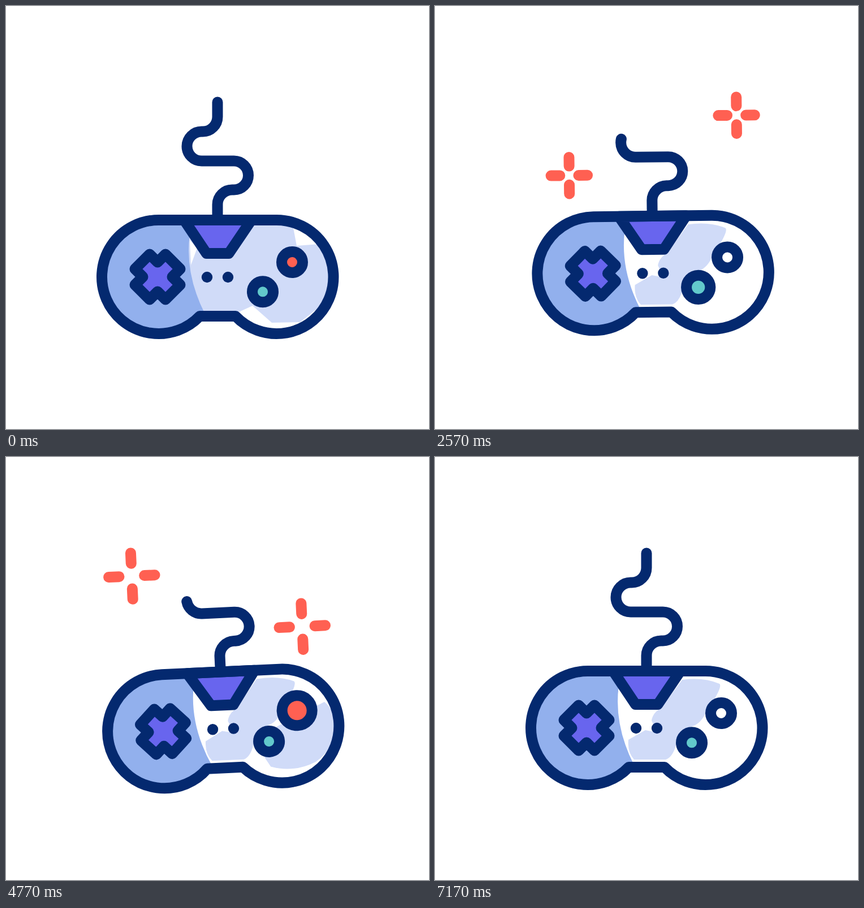
An HTML page that plays this animation: 748 by 748 pixels, repeating every 7.2 s.

```html
<!DOCTYPE html>
<html lang="en">
<head>
<meta charset="utf-8">
<title>Game controller</title>
<style>
  html, body { margin: 0; width: 100%; height: 100%; overflow: hidden; background: #fff; }
  svg { display: block; width: 100vw; height: 100vh; }
  .line { fill: none; stroke: #04296f; stroke-width: 19; stroke-linecap: round; stroke-linejoin: round; }
  .ink { fill: #04296f; }
  .pale { fill: #d0dbf8; }
  .blue { fill: #92b0ed; }
  .violet { fill: #6865ee; }
  .teal { fill: #62c9cb; }
  .spark { fill: none; stroke: #ff6052; stroke-linecap: round; }
</style>
</head>
<body>
<svg viewBox="0 0 748 748">
  <defs>
    <path id="shell" d="M270 378.5H478.5A100.5 100.5 0 1 1 405.9 548.5H342.6A100.5 100.5 0 1 1 270 378.5Z"/>
    <clipPath id="inside"><use href="#shell"/></clipPath>
  </defs>
  <g id="pad">
    <path id="cable" class="line" d="M374 170V196A26 26 0 0 1 348 222H346A26 26 0 0 0 346 274H403A25.5 25.5 0 0 1 403 325H400A26 26 0 0 0 374 351V378"/>
    <g clip-path="url(#inside)">
      <use href="#shell" fill="#fff"/>
      <use id="fullFill" href="#shell" class="pale"/>
      <path id="gaps" fill="#fff" d="M412 541L436 530L470 560L520 559L552 534L540 590H430ZM508 392L514 424L554 421L545 400ZM325 414L338 428L327 458Z"/>
      <path id="lobeFill" class="pale" d="M425 500L555 440Q572 455 572 482Q568 525 535 545Q495 563 455 550Z"/>
      <path id="bandFill" class="pale" d="M437 394Q475 389 503 401Q510 406 480 450Q470 472 455 476Q432 485 426 510Q420 531 408 535H352Q340 522 342 500L372 483L392 487L383 466Q385 452 400 444Z"/>
      <path class="blue" d="M150 360H333L330 378Q309 460 352 545V600H150Z"/>
    </g>
    <path class="line violet" d="M315 378.5L354.5 437.5H394L434 378.5Z"/>
    <use href="#shell" class="line"/>
    <path class="line violet" transform="translate(268 479) rotate(45)"
      d="M-18.4 -38.2H18.4V-18.4H38.2V18.4H18.4V38.2H-18.4V18.4H-38.2V-18.4H-18.4Z"/>
    <circle class="ink" cx="355.5" cy="479.5" r="9.7"/>
    <circle class="ink" cx="392.5" cy="479.5" r="9.7"/>
    <circle id="redButton" class="line" cx="506" cy="453"/>
    <circle id="tealButton" class="line teal" cx="454" cy="505.3"/>
    <path id="risingLeft" class="spark"/>
    <path id="risingRight" class="spark"/>
  </g>
</svg>
<script>
const CYCLE = 3600, LOOP = 2 * CYCLE, BUTTON = 18.5, PRESS = 8;
const $ = id => document.getElementById(id);
const clamp = v => Math.max(0, Math.min(1, v));
const ease = v => 0.5 - 0.5 * Math.cos(Math.PI * clamp(v));
const mix = (a, b, v) => a + (b - a) * ease(v);
const show = (id, on) => { $(id).style.display = on ? "" : "none"; };

// Eases from one turning point [time, value] to the next, starting from zero.
function swing(t, ...turns) {
  let from = 0, value = 0;
  for (const [to, next] of turns) {
    if (t < to) return mix(value, next, (t - from) / (to - from));
    from = to;
    value = next;
  }
  return value;
}

// A rocking motion that swells, fades and slows down slightly.
function tilt(t) {
  const s = (t - 1770) / 1000;
  return 9 * Math.sin(Math.PI * t / CYCLE) ** 2 * Math.cos(0.98 + 4.763 * s - 0.321 * s * s);
}

// Four rays leave each of two centres, mirrored across the pad.
function drawSparks(id, side, birth, t) {
  const u = (t - birth) / 630, visible = u > 0 && u < 1;
  show(id, visible);
  if (!visible) return;
  const inner = 52 * u;
  const outer = 52 * Math.sin(Math.PI / 2 * Math.min(1, u / 0.75));
  let d = "";
  for (const [x, y] of [[375 + side * 150, 202], [375 - side * 147, 305]])
    for (let k = 0; k < 4; k++) {
      const dx = Math.cos(k * Math.PI / 2), dy = Math.sin(k * Math.PI / 2);
      d += `M${x + dx * inner} ${y + dy * inner}L${x + dx * outer} ${y + dy * outer}`;
    }
  $(id).setAttribute("d", d);
  $(id).setAttribute("stroke-width", 19 * Math.min(1, u * 6, (1 - u) * 6));
}

const pulse = (t, peak) => ease(1 - Math.max(0, Math.abs(t - peak) - 40) / 260);
const cableLength = $("cable").getTotalLength();
$("cable").setAttribute("stroke-dasharray", `${cableLength} ${cableLength}`);

function render(time) {
  const t = time % CYCLE;
  const x = swing(t, [250, 0], [840, -25], [1270, 15], [1950, -10.5], [2850, 17.5], [3560, 0]);
  const y = swing(t, [900, 0], [2080, 11.3], [2620, -7.4], [3100, 0]);
  $("pad").setAttribute("transform", `translate(${x} ${y}) rotate(${tilt(t)} 374 479)`);

  const pulled = 131 * Math.min(ease((t - 150) / 1350), ease((3540 - t) / 1400));
  $("cable").setAttribute("stroke-dashoffset", -pulled);

  show("fullFill", t < 900);
  show("gaps", time < 900);
  show("lobeFill", t >= 900 && t < 1400);
  show("bandFill", t >= 900);

  $("redButton").setAttribute("r", BUTTON + PRESS * pulse(t, 1170));
  $("redButton").style.fill = t < 1400 ? "#ff6052" : "#fff";
  $("tealButton").setAttribute("r", BUTTON + PRESS * (pulse(t, 1770) + pulse(t, 2770)));

  drawSparks("risingLeft", -1, 900, t);
  drawSparks("risingRight", 1, 2370, t);
}

const start = performance.now();
function tick() {
  render((performance.now() - start) % LOOP);
  requestAnimationFrame(tick);
}
tick();
</script>
</body>
</html>
```
